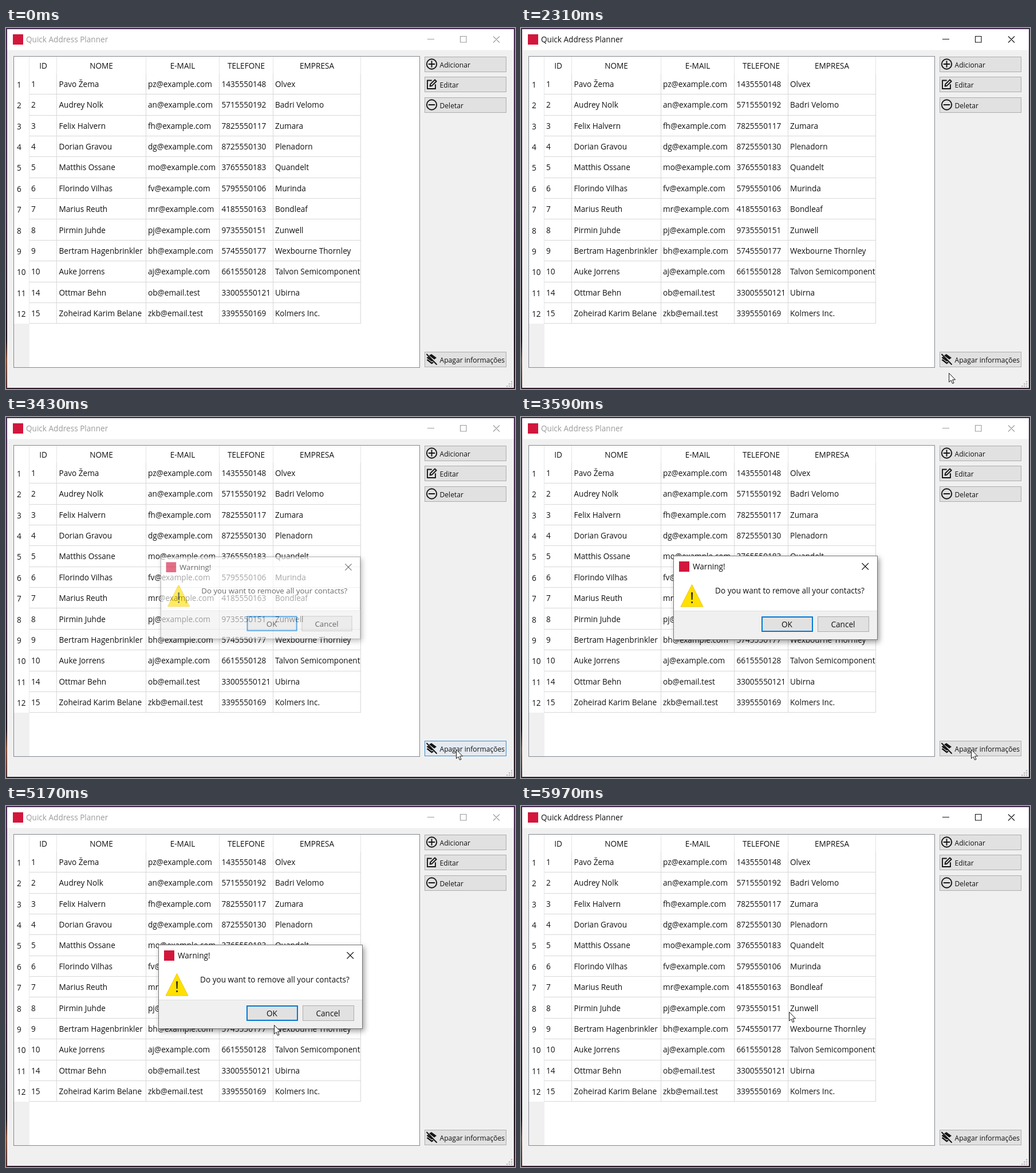
Animation of 889x630 px, one loop 8000 ms. Source, as an HTML page:

```html
<!DOCTYPE html>
<html lang="pt">
<head>
<meta charset="utf-8">
<title>Quick Address Planner</title>
<style>
html, body { margin: 0; width: 100%; height: 100%; overflow: hidden; }
svg { display: block; width: 889px; height: 630px; }
text { font: 13.6px "Open Sans", "Noto Sans", sans-serif; fill: #111; white-space: pre; }
.small { font-size: 12.1px; }
.mid { text-anchor: middle; }
.icon { fill: none; stroke: #151515; stroke-width: 1.9; stroke-linejoin: round; stroke-linecap: round; }
#dialog { filter: drop-shadow(3px 4px 5px rgba(0, 0, 0, .38)); transform-origin: 444px 315px; }
</style>
</head>
<body>
<svg id="stage" viewBox="0 0 889 630"></svg>
<script>
const people = [
  [1, 'Pavo Žema', 'pz@example.com', '1435550148', 'Olvex'],
  [2, 'Audrey Nolk', 'an@example.com', '5715550192', 'Badri Velomo'],
  [3, 'Felix Halvern', 'fh@example.com', '7825550117', 'Zumara'],
  [4, 'Dorian Gravou', 'dg@example.com', '8725550130', 'Plenadorn'],
  [5, 'Matthis Ossane', 'mo@example.com', '3765550183', 'Quandelt'],
  [6, 'Florindo Vilhas', 'fv@example.com', '5795550106', 'Murinda'],
  [7, 'Marius Reuth', 'mr@example.com', '4185550163', 'Bondleaf'],
  [8, 'Pirmin Juhde', 'pj@example.com', '9735550151', 'Zunwell'],
  [9, 'Bertram Hagenbrinkler', 'bh@example.com', '5745550177', 'Wexbourne Thornley'],
  [10, 'Auke Jorrens', 'aj@example.com', '6615550128', 'Talvon Semicomponent'],
  [14, 'Ottmar Behn', 'ob@email.test', '33005550121', 'Ubirna'],
  [15, 'Zoheirad Karim Belane', 'zkb@email.test', '3395550169', 'Kolmers Inc.']
];
const columns = [['ID', 65, 44], ['NOME', 166.5, 92.5], ['E-MAIL', 308.5, 248],
  ['TELEFONE', 419.5, 376.5], ['EMPRESA', 543, 470]];
const pitch = 36.36;

const rect = (x, y, w, h, fill, more = '') =>
  `<rect x="${x}" y="${y}" width="${w}" height="${h}" fill="${fill}" ${more}/>`;
const box = (x, y, w, h, fill, stroke, more = '') =>
  rect(x + .5, y + .5, w - 1, h - 1, fill, `stroke="${stroke}" ${more}`);
const text = (x, y, s, cls = '') => `<text x="${x}" y="${y}" class="${cls}">${s}</text>`;
const icon = d => `<path class="icon" d="${d}"/>`;
const ring = y => `<circle class="icon" cx="743.5" cy="${y}" r="8.7"/>`;
const button = (y, label, overlay = '') => box(731, y, 143, 27, '#e1e1e1', '#adadad') + overlay +
  text(757.5, y + 18.5, label, 'small');

function table() {
  let out = box(13, 49, 710, 544, '#fff', '#828790') + rect(14, 516, 27, 76, '#f0f0f0');
  out += rect(40, 50, 1, 466, '#e8e8e8');
  for (const x of [88, 244, 372, 466, 619])
    out += rect(x, 50, 1, 30, '#e5e5e5') + rect(x, 80, 1, 436, '#d8d8d8');
  for (const [name, center] of columns) out += text(center, 71, name, 'mid');
  people.forEach((row, i) => {
    const y = Math.round(103 + pitch * i);
    out += rect(41, Math.round(115.3 + pitch * i), 579, 1, '#d8d8d8') + text(19, y + 1, i + 1);
    row.forEach((cell, c) => out += text(columns[c][2], y, cell));
  });
  return out;
}

function grip() {
  let out = '';
  for (let r = 0; r < 3; r++)
    for (let c = 2 - r; c < 3; c++) out += rect(874 + c * 4, 616 + r * 4, 2.4, 2.4, '#bcbcbc');
  return out;
}

const stage = document.getElementById('stage');
stage.innerHTML = `
<defs><linearGradient id="desk" x2="0" y2="1">
  <stop stop-color="#45294f"/><stop offset=".5" stop-color="#3a2340"/>
  <stop offset=".85" stop-color="#180e18"/><stop offset="1" stop-color="#2c1a28"/>
</linearGradient>
<linearGradient id="glow" x2="0" y2="1">
  <stop stop-color="#180e18"/><stop offset=".4" stop-color="#85482c"/><stop offset="1" stop-color="#4a2a2c"/>
</linearGradient></defs>
${rect(0, 0, 889, 630, 'url(#desk)')}
${rect(0, 545, 2, 85, 'url(#glow)')}
${rect(2, 2, 885, 626, '#f0f0f0')}
${rect(2, 2, 885, 36.5, '#fff')}
${rect(12, 11, 18, 18, '#d3163c')}
<g id="caption">${text(35, 25, 'Quick Address Planner')}
  <path d="M736 19.5h12M793.5 14.5h10.500v10.500h-10.500zM851 14.500l11 11m0-11l-11 11" fill="none" stroke="#111" stroke-width="1.1"/></g>
${table()}
${button(50, 'Adicionar')}${ring(63)}${icon('M738.500 63h10M743.500 58v10')}
${button(85, 'Editar')}${icon('M743 91.500h-7v14.500h14v-7M740.500 101.500l.8-3.500 7.700-7.700 2.700 2.700-7.700 7.700z')}
${button(121, 'Deletar')}${ring(134)}${icon('M738.500 134h10')}
${button(565, 'Apagar informações', box(731, 565, 143, 27, '#e5f1fb', '#0078d7', 'id="hover"'))}
<path d="M739 571.500l4-2.500 9 6.500-4 3zM734.500 575.500l2.500-2 9 7-2.500 1.500zM734.500 579.500l2-1.500 7 5.500 1.500-1 2 1.500-3.500 2.500z" fill="#151515"/>
${icon('M735 569.500l17 17.500')}
${grip()}
<g id="dialog">
  ${box(266, 242, 357, 147, '#fff', '#777')}
  ${rect(267, 338, 355, 50, '#f0f0f0')}${rect(267, 338, 355, 1, '#dfdfdf')}
  ${rect(276, 252, 18, 18, '#d3163c')}
  ${text(300, 266, 'Warning!')}
  <path d="M595.500 255l11.500 11.500m0-11.500l-11.500 11.500" stroke="#111" stroke-width="1.1"/>
  <path d="M298.500 292.500l19.500 38.500h-39z" fill="#ffe000" stroke="#f0c419" stroke-linejoin="round"/>
  <path d="M297.200 306h2.800l-.5 13h-1.800zM297.300 322h2.600v2.800h-2.600z" fill="#222"/>
  ${text(339, 307.500, 'Do you want to remove all your contacts?')}
  ${rect(421, 349, 88, 25, '#e1e1e1', 'id="ok" stroke="#0078d7" stroke-width="2"')}
  ${text(464.500, 367, 'OK', 'mid')}
  ${box(518, 348, 90, 27, '#e1e1e1', '#adadad')}
  ${text(562.500, 367, 'Cancel', 'mid')}
</g>
<path id="sizer" d="M0 0l5 5.500h-3.500v8h3.500l-5 5.500-5-5.500h3.500v-8h-3.500z" fill="#fff" stroke="#111"/>
<path id="arrow" d="M.5.5V16L4 12.800 6.500 18.500 9 17.400 6.500 11.900H11.500Z" fill="#fff" stroke="#111"/>`;

const $ = id => document.getElementById(id);
const set = (id, name, value) => $(id).setAttribute(name, value);
const ramp = (t, from, to) => Math.max(0, Math.min(1, (t - from) / (to - from)));
const easeOut = p => 1 - (1 - p) ** 3;

// time, x, y
const sizerPath = [[1030, 762.5, 623.5], [1150, 753, 619.5], [1290, 740.5, 625]];
const arrowPath = [[2040, 738, 629], [2310, 747, 602], [2460, 764, 589], [2620, 780, 582],
  [2820, 786, 580], [3920, 786, 580], [4020, 756, 578], [4260, 602, 565], [4480, 538, 558],
  [4860, 538, 558], [4960, 518, 503], [5060, 482, 425], [5170, 468, 382], [5320, 468, 366], [5530, 468, 359]];

function along(path, t) {
  const last = path.length - 1;
  if (t >= path[last][0]) return path[last].slice(1);
  const i = Math.max(1, path.findIndex(k => k[0] > t));
  const [a, b] = [path[i - 1], path[i]];
  const p = ramp(t, a[0], b[0]);
  return [a[1] + (b[1] - a[1]) * p, a[2] + (b[2] - a[2]) * p];
}

function place(id, path, t, shown) {
  set(id, 'transform', `translate(${along(path, t)})`);
  set(id, 'visibility', shown ? 'visible' : 'hidden');
}

function draw(t) {
  const active = t >= 1620 && t < 3350 || t >= 5800;
  set('caption', 'opacity', active ? 1 : .42);

  const pressed = t >= 3180 && t < 3300;
  set('hover', 'opacity', ramp(t, 2440, 2590) * (1 - ramp(t, 3350, 3560)));
  set('hover', 'fill', pressed ? '#cce4f7' : '#e5f1fb');
  set('hover', 'stroke', pressed ? '#005499' : '#0078d7');

  const closing = ramp(t, 5800, 5960);
  const scale = .9 + .1 * easeOut(ramp(t, 3350, 3550)) - .1 * closing;
  const dialog = $('dialog').style;
  dialog.opacity = ramp(t, 3350, 3480) * (1 - closing);
  dialog.transform = `scale(${scale})`;
  set('ok', 'fill', t >= 5730 ? '#cce4f7' : t >= 5250 ? '#e5f1fb' : '#e1e1e1');

  place('sizer', sizerPath, t, t >= 1030 && t < 1290);
  place('arrow', arrowPath, t, t >= 2040);
}

const start = performance.now();
function tick() {
  draw((performance.now() - start) % 8000);
  requestAnimationFrame(tick);
}
tick();
</script>
</body>
</html>
```
